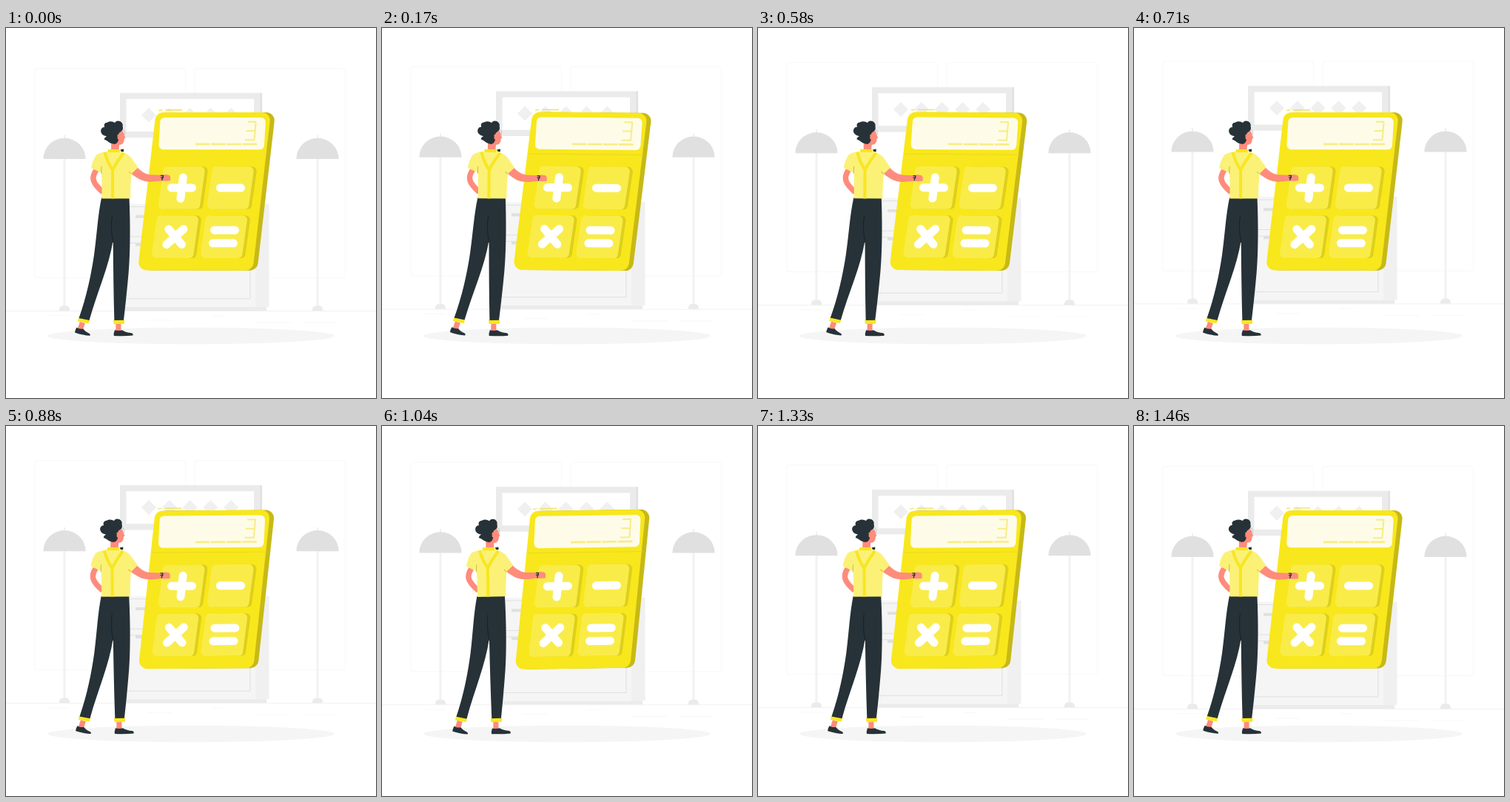
An HTML page with a canvas that plays this animation: 500 by 500 pixels, repeating every 1500 ms.

```html
<!DOCTYPE html>
<html lang="en">
<head>
<meta charset="utf-8">
<title>Calculator</title>
<style>
html, body { margin: 0; width: 100%; height: 100%; overflow: hidden; background: #fff; }
canvas { display: block; width: 500px; height: 500px; }
</style>
</head>
<body>
<canvas id="stage" width="500" height="500"></canvas>
<script>
const canvas = document.getElementById('stage');
const ctx = canvas.getContext('2d');
const LOOP = 1500, STEPS = 36;
const YELLOW = '#f8e71c', SHIRT = '#fbf177', DARK = '#263238', SKIN = '#ff8b7b';

function fill(d, color) {
  ctx.fillStyle = color;
  ctx.fill(new Path2D(d));
}

function stroke(d, color, width, cap = 'butt') {
  ctx.strokeStyle = color;
  ctx.lineWidth = width;
  ctx.lineCap = cap;
  ctx.lineJoin = 'round';
  ctx.stroke(new Path2D(d));
}

function rect(x, y, w, h, color) {
  ctx.fillStyle = color;
  ctx.fillRect(x, y, w, h);
}

// Rounded slab whose top edge is shifted right by `lean`.
function slab(x, y, w, h, lean, r, color) {
  ctx.beginPath();
  ctx.moveTo(x + lean + w / 2, y);
  ctx.arcTo(x + lean + w, y, x + w, y + h, r);
  ctx.arcTo(x + w, y + h, x, y + h, r);
  ctx.arcTo(x, y + h, x + lean, y, r);
  ctx.arcTo(x + lean, y, x + lean + w, y, r);
  ctx.closePath();
  ctx.fillStyle = color;
  ctx.fill();
}

function swing(cx, cy, degrees, draw) {
  ctx.save();
  ctx.translate(cx, cy);
  ctx.rotate(degrees * Math.PI / 180);
  ctx.translate(-cx, -cy);
  draw();
  ctx.restore();
}

function lamp(x) {
  rect(x - 1, 145, 2, 6, '#f0f0f0');
  rect(x - 1.5, 177, 3, 199, '#f2f2f2');
  fill(`M${x - 28.6} 177.3A28.6 28.2 0 0 1 ${x + 28.6} 177.3Z`, '#e0e0e0');
  fill(`M${x - 7} 382.3V380Q${x - 6} 375.5 ${x - 2} 375.5H${x + 2}Q${x + 6} 375.5 ${x + 7} 380V382.3Z`, '#ebebeb');
}

function room() {
  ctx.strokeStyle = '#f8f8f8';
  ctx.lineWidth = 1;
  for (const x of [39, 255]) {
    ctx.beginPath();
    ctx.roundRect(x, 54.8, 203.5, 283, 3);
    ctx.stroke();
  }
  rect(0, 382.3, 500, .7, '#ebebeb');
  stroke('M57 388.8H86M278 389.2H297M191 395.2H224M337 398.2H386M402 398.2H447', '#f5f5f5', .7);

  rect(343, 88, 3, 60.5, '#e0e0e0');
  rect(154, 88, 189.5, 60.5, '#ebebeb');
  rect(162.5, 96.2, 172.5, 44, '#fff');
  for (let i = 0; i < 5; i++) {
    fill(`M${193 + i * 27.8} 108l10 10l-10 10l-10 -10Z`, '#f0f0f0');
  }

  rect(337, 237.8, 18.5, 139.4, '#f0f0f0');
  rect(158, 377.2, 194, 5.1, '#ebebeb');
  rect(155, 237.8, 182, 139.4, '#f5f5f5');
  stroke('M160 241.8H330V282.2H160ZM160 290.8H330V366.2H160Z', '#e0e0e0', 1);
  rect(175, 253, 24, 4, '#e0e0e0');
  rect(175, 291, 24, 4, '#e0e0e0');
  lamp(79);
  lamp(421);
}

function key(x, y) {
  slab(x + 4.5, y, 56, 57.5, 8, 6, '#decf1b');
  slab(x, y, 56.5, 57.5, 8, 6, '#f9ec49');
}

function calculator(angle) {
  stroke('M206 111.6L211 110.8M215.5 110.8H238', '#eee05a', 1.3);
  slab(183.5, 114, 156, 213.6, 24.5, 11, '#c7b916');
  slab(178, 114, 155.5, 213.6, 24.5, 11, YELLOW);

  ctx.globalAlpha = Math.min(1, Math.abs(angle) * 2.5);
  stroke('M198 170.7H354', '#e6d51a', .8);
  ctx.globalAlpha = 1;

  slab(206, 121, 142.5, 43.3, 2.6, 6, '#fefce8');
  stroke('M326.5 126.8H337.5L335.5 151.2H323M324.5 139H336', '#f8ec85', 2);
  for (let i = 0; i < 4; i++) rect(256 + i * 21.2, 155.6, 19.6, 2.6, '#f8ec85');

  key(205, 187.3);
  key(271, 187.3);
  key(196.3, 253.4);
  key(262.3, 253.4);
  stroke('M223.5 216H251.5M239.3 202L235.9 230.5M289.5 216H317.5', '#fff', 11, 'round');
  stroke('M220 272L237.5 292.5M240 271.8L217 292.7M281.5 273.2H309.5M279.5 290.8H307.5', '#fff', 11, 'round');
}

function man() {
  // Far arm, ankles and shoes
  stroke('M122 192C115 202 116 209 131 222', SKIN, 7.5);
  fill('M100 397L107 399L104 408L97 406Z', SKIN);
  fill('M148.5 399H155.5V410H148.5Z', SKIN);
  fill('M95.5 404.8Q100 407.3 104.5 406.6Q107 410.5 113 413Q114.8 414.5 113.5 415.8Q105 415.5 93.5 411.8Q92.6 410.5 95.5 404.8Z', DARK);
  fill('M147 408.3Q153 409.6 157 408.2Q162 411.5 170 412.2Q172.5 413.5 171.5 415.6Q160 416.8 146 416Q145.2 413 147 408.3Z', DARK);

  // Trousers
  fill('M129 229.5H166.5C168 262 168.5 310 164.5 344Q162 371 159 396H146.5C145.5 360 145 325 144.7 287C139 323 124 355 112.5 395.5L98.5 392.5C109 363 115 334 119 307C123 278 124 253 129 229.5Z', DARK);
  stroke('M143.5 254Q141 270 144.7 290', '#182126', 1);
  fill('M98.2 392L112.8 395L111.8 399.3L97 396.6Z', YELLOW);
  fill('M145 395L160.3 394.8L160 399.8L145.8 400.2Z', YELLOW);

  // Neck and face
  fill('M149 140Q158 137 159 142L159.8 145L161.3 148.3L159.7 149.7Q159.8 157.5 153 158L152.3 166H142V154Z', SKIN);
  stroke('M156 138.5Q161.5 136.5 160.5 143Q160 147 157 145M152 142L156 142', '#b9b2b2', .7);
  fill('M132.5 150.5Q133 147.5 136 146.5Q127.5 144.5 128 138.5Q129 134 133 134Q131 128.5 137 127.5Q142 125 147 128Q149 124.5 154 126Q158.5 128.5 157.5 133Q159 137.5 155 140Q151 142 152 147Q152.5 156 146.5 157Q140 156 136.5 152.5Z', DARK);
  fill('M150.5 144Q154 143 153.8 147Q153 151 150.5 150Z', SKIN);

  // Near arm
  fill('M166 194L176 187Q185 197 194 198.3L210 198.8Q215 197 221 199Q223 201.5 221.8 206.5L213 206.8L209 206.2C196 208.8 185 208 178 203Q171 199 166 194Z', SKIN);
  stroke('M209 199.2L212.5 199.5L210.5 206M209 202H213', DARK, 1.3);

  // Shirt and braces
  fill('M137 167H154Q163 168.5 169 175L178.5 188.5L169.5 197Q168 212 168 230.5H129.5Q129.8 213 129 195.5L115.2 189.5Q116.5 179 122 171.5Q127 168 137 167Z', SHIRT);
  stroke('M129 187L128.6 197M169 197L166 194', '#c9bd38', 1);
  stroke('M133.5 168Q137 182 144 191.5Q151 179 158.5 169M144 191V230.5', '#f7e622', 4);
  fill('M137.5 164H154V168H137.5Z', YELLOW);
  fill('M154.5 164.2L159 163.5V167.3L155.5 167Z', DARK);
}

// Triangle wave: 0, 1, 0, -1, 0 over one turn.
const triangle = u => 1 - 4 * Math.abs(((u + .25) % 1) - .5);

function draw(time) {
  const step = Math.floor((time % LOOP) / LOOP * STEPS + .15) % STEPS;
  const u = (step + .5) / STEPS;
  const angle = triangle(u);

  ctx.fillStyle = '#fff';
  ctx.fillRect(0, 0, 500, 500);

  ctx.save();
  ctx.translate(0, -10 * (1 - Math.abs(2 * u - 1)));
  room();
  ctx.restore();

  ctx.fillStyle = '#f5f5f5';
  ctx.beginPath();
  ctx.ellipse(250, 416, 194, 11.3, 0, 0, Math.PI * 2);
  ctx.fill();

  swing(271, 220.5, angle, () => calculator(angle));
  swing(157.5, 271, angle, man);
}

const start = performance.now();
function tick() {
  draw(performance.now() - start);
  requestAnimationFrame(tick);
}
tick();
</script>
</body>
</html>
```
